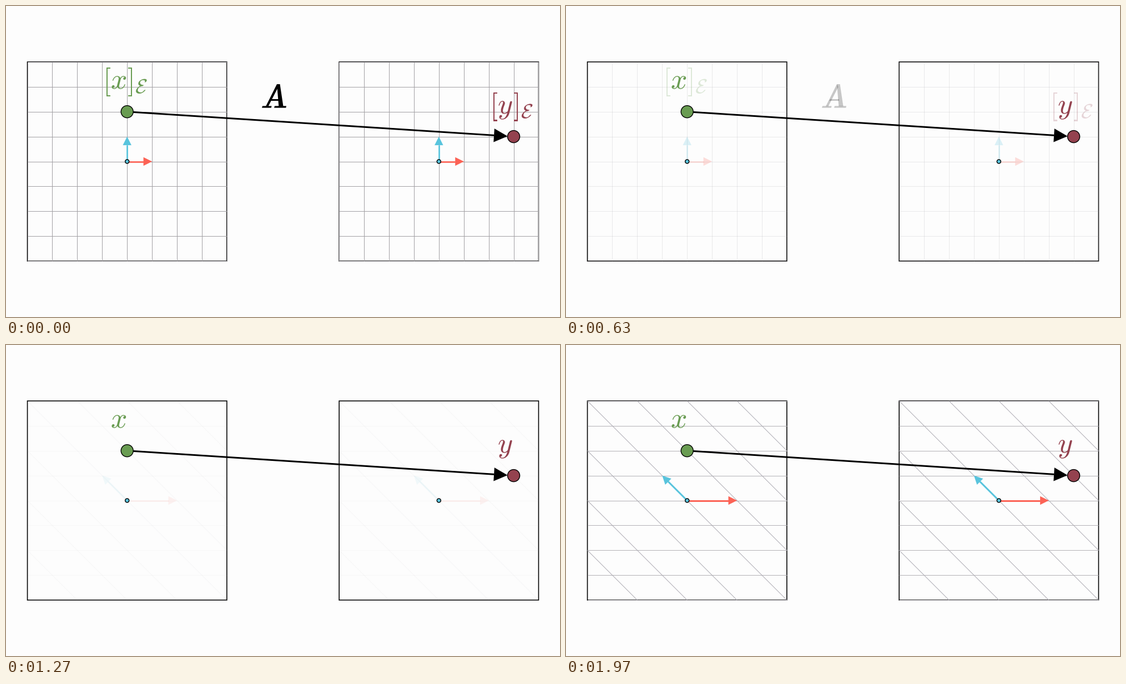
These frames come from a looping animation (998x561 px, 2010 ms). A matplotlib script:

```python
import math

import matplotlib.pyplot as plt
import numpy as np
from matplotlib.animation import FuncAnimation
from matplotlib.patches import Circle, PathPatch, Polygon, Rectangle
from matplotlib.textpath import TextPath
from matplotlib.transforms import Affine2D

plt.rcParams["mathtext.fontset"] = "cm"

W, H, DPI = 998, 561, 100
FRAMES, STEP = 67, 30          # 67 * 30 ms = one 2010 ms loop
PX = 72 / DPI                  # points per pixel
U = 44.91                      # grid unit
HALF = 4 * U
CY = 280.5
CENTERS = (218.2, 779.8)
EM = 52                        # label size

BLUE, RED = "#58c4dd", "#fc6255"
GREEN, MAROON = "#699c52", "#94424f"

fig = plt.figure(figsize=(W / DPI, H / DPI), dpi=DPI, facecolor="#fdfdfd")
ax = fig.add_axes([0, 0, 1, 1])
ax.set_xlim(0, W)
ax.set_ylim(H, 0)
ax.axis("off")


def line(p, q, color, width, z, **kw):
    return ax.plot([p[0], q[0]], [p[1], q[1]], color=color, lw=width * PX,
                   zorder=z, solid_capstyle="butt", **kw)[0]


def arrow(p, q, color, width, tip, z):
    """Straight shaft with a filled triangular tip ending at q."""
    p, q = np.array(p, float), np.array(q, float)
    d = (q - p) / np.hypot(*(q - p))
    n = np.array([-d[1], d[0]]) * tip / 2
    base = q - d * tip
    head = Polygon([q, base + n, base - n], fc=color, lw=0, zorder=z)
    ax.add_patch(head)
    return [line(p, base, color, width, z), head]


def dot(x, y, r, color, width, z):
    ax.add_patch(Circle((x, y), r, fc=color, ec="black", lw=width * PX, zorder=z))


def glyph(tex, x, y, size, color):
    """Math text with its baseline origin at (x, y)."""
    flip = Affine2D().scale(1, -1).translate(x, y)
    patch = PathPatch(TextPath((0, 0), f"${tex}$", size=size).transformed(flip),
                      fc=color, lw=0, zorder=8)
    ax.add_patch(patch)
    return patch


def label(var, x, y, advance, color):
    """Bracketed variable; returns only the parts that fade."""
    start = x + 0.278 * EM
    close = start + advance * EM
    glyph(var, start, y, EM, color)
    return [glyph("[", x, y, EM, color),
            glyph("]", close, y, EM, color),
            glyph(r"\mathcal{E}", close + 0.278 * EM, y + 7.8, 0.7 * EM, color)]


def bold_a():
    strokes = [
        [(488, 141), (493.5, 141), (499.5, 181), (491.3, 181)],
        [(488, 141), (490.5, 146), (472.5, 181), (468, 181)],
        [(476, 167.5), (492, 167.5), (492, 170.7), (474, 170.7)],
        [(462, 180.4), (478.5, 180.4), (477.8, 183.6), (461, 183.6)],
        [(484, 180.4), (505, 180.4), (504.3, 183.6), (483, 183.6)],
    ]
    return [ax.add_patch(Polygon(s, fc="black", lw=0, zorder=8)) for s in strokes]


def square_grid(cx):
    parts = []
    for k in np.arange(-4, 5) * U:
        parts.append(line((cx + k, CY - HALF), (cx + k, CY + HALF), "#a2a0a4", 1, 2))
        parts.append(line((cx - HALF, CY + k), (cx + HALF, CY + k), "#a2a0a4", 1, 2))
    return parts


def skew_grid(cx):
    parts = []
    for k in np.arange(-4, 5) * U:
        parts.append(line((cx - HALF, CY + k), (cx + HALF, CY + k), "#b3b1b6", 1, 2))
    for k in np.arange(-3, 4) * 2 * U:
        a, b = max(-HALF, k - HALF), min(HALF, k + HALF)
        parts.append(line((cx + a, CY + a - k), (cx + b, CY + b - k), "#aeacb4", 1, 2))
    return parts


def basis(cx, e1, e2, width):
    ends = ((e1, RED), (e2, BLUE))
    return [part for (a, b), color in ends
            for part in arrow((cx, CY), (cx + a * U, CY - b * U), color, width, 15.5, 4)]


before, after = [], []
for cx in CENTERS:
    ax.add_patch(Rectangle((cx - HALF, CY - HALF), 2 * HALF, 2 * HALF, fill=False,
                           ec="black", lw=1.6 * PX, zorder=1, snap=False))
    before += square_grid(cx) + basis(cx, (1, 0), (0, 1), 2.7)
    after += skew_grid(cx) + basis(cx, (2, 0), (-1, 1), 3)
    dot(cx, CY, 3.5, BLUE, 1.4, 6)

xdot = (CENTERS[0], CY - 2 * U)
ydot = (CENTERS[1] + 3 * U, CY - U)
arrow((xdot[0] + 11, xdot[1] + 0.7), (ydot[0] - 11, ydot[1] - 0.7), "black", 3, 24.5, 5)
dot(*xdot, 11, GREEN, 1.4, 7)
dot(*ydot, 11, MAROON, 1.4, 7)

before += label("x", 174.4, 149.6, 0.572, GREEN)
before += label("y", 871.6, 194.5, 0.526, MAROON)
before += bold_a()


def smooth(t):
    """Sigmoid ease, rescaled to run exactly from 0 to 1."""
    def sig(v):
        return 1 / (1 + math.exp(-v))
    low = sig(-5)
    s = (sig(10 * (t - 0.5)) - low) / (1 - 2 * low)
    return min(max(s, 0.0), 1.0)


def draw(i):
    t = i * STEP / 1000
    for part in before:
        part.set_alpha(1 - smooth(t))
    for part in after:
        part.set_alpha(smooth(t - 1))
    return before + after


anim = FuncAnimation(fig, draw, frames=FRAMES, interval=STEP, repeat=True,
                     repeat_delay=0, blit=False)
plt.show()
```
